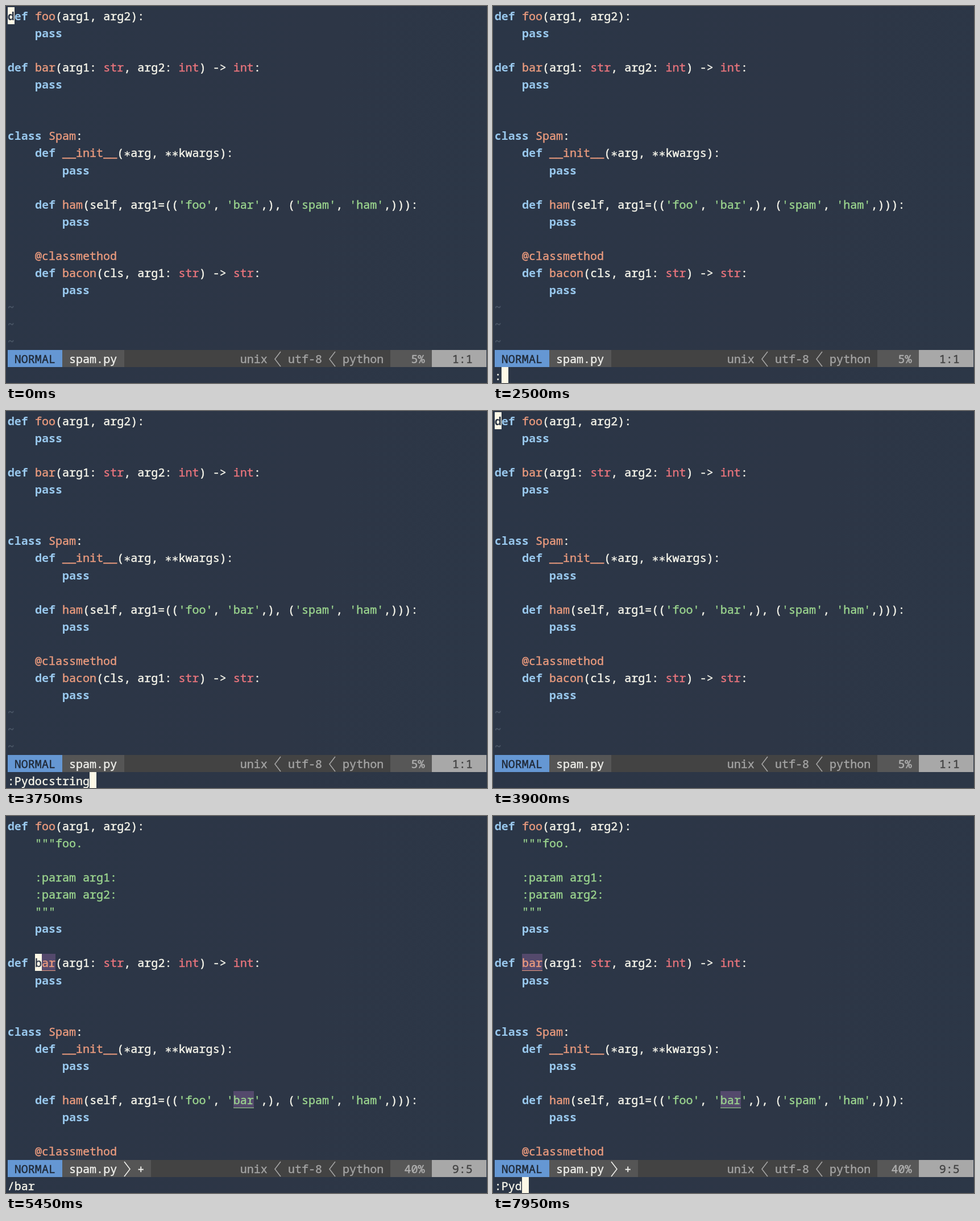
Animation, 846 px wide and 662 px high, one loop 8000 ms. Source, as an HTML page:

```html
<!DOCTYPE html>
<html lang="en">
<head>
<meta charset="utf-8">
<title>Docstring demo</title>
<style>
  html, body { margin: 0; width: 100%; height: 100%; overflow: hidden; background: #2c3646; }
  #stage {
    position: relative; width: 846px; height: 662px; overflow: hidden;
    background: linear-gradient(100deg, #2b3647, #2d3646 60%, #2c3747);
    color: #f8f7ec; font: 500 20.05px/32px "Noto Sans Mono", "DejaVu Sans Mono", monospace;
    font-variant-ligatures: none; -webkit-text-stroke: 0.4px currentColor;
  }
  #stage > * { position: absolute; box-sizing: border-box; height: 30.09px; white-space: pre; }
  #stage .key { color: #98c7ec; font-weight: 700; -webkit-text-stroke-width: 0; }
  .name { color: #eb9b7e; }
  .type { color: #ea757d; }
  .str { color: #9bd58e; }
  .star { padding-top: 4px; font-family: "DejaVu Sans Mono", monospace; }
  .tilde { color: #4c5868; }
  .match { background: #54496c; border-bottom: 1.5px solid; }
  .current { background: #9c5a66; }
  #stage .cursor { background: #fdf8e6; color: #2c3646; }
  .mode { background: #6597d3; color: #202a38; }
  .file { background: #555; color: #f0f0ec; }
  .info { background: #434343; color: #a4a4a4; }
  .pct { background: #575757; color: #b0b0b0; }
  .pos { background: #a8a8a8; color: #444; }
  svg { fill: none; stroke: currentColor; stroke-width: 1.6; }
</style>
</head>
<body>
<div id="stage"></div>
<script>
const LOOP = 8000, CW = 12.03, RH = 30.09, LEFT = 2.8, TOP = 1.7;
const STATUS = 20, CMD = 21;
const stage = document.getElementById('stage');

const code = `def foo(arg1, arg2):
    pass

def bar(arg1: str, arg2: int) -> int:
    pass


class Spam:
    def __init__(*arg, **kwargs):
        pass

    def ham(self, arg1=(('foo', 'bar',), ('spam', 'ham',))):
        pass

    @classmethod
    def bacon(cls, arg1: str) -> str:
        pass`.split('\n');
const doc = `    """foo.

    :param arg1:
    :param arg2:
    """`.split('\n');
const documented = [code[0], ...doc, ...code.slice(1)];

const rules = [
  ['str', /""".*|:param.*|'[^']*'/],
  ['key', /\b(?:def|class|pass)\b/],
  ['name', /(?<=def |class )\w+|@\w+/],
  ['type', /\b(?:str|int)\b/],
  ['star', /\*+/]
];
const lexer = new RegExp(rules.map(r => `(${r[1].source})`).join('|'), 'g');

// Each step keeps the values of the one before it.
const steps = [
  [0, { lines: code, mode: 'NORMAL', pct: '5%', pos: '1:1', at: [0, 0], cmd: '', typing: false, on: true, find: '', live: false }],
  [500, { on: false }],
  [950, { on: true }],
  [1300, { cmd: ':', typing: true }],
  [1900, { on: false }],
  [2250, { on: true }],
  [2550, { on: false }],
  [2800, { cmd: ':P', on: true }],
  [2950, { cmd: ':Py' }],
  [3150, { cmd: ':Pyd' }],
  [3300, { cmd: ':Pydo' }],
  [3450, { cmd: ':Pydoc' }],
  [3600, { cmd: ':Pydocstring' }],
  [3800, { cmd: '', typing: false }],
  [4200, { lines: documented, pct: '9%', pos: '2:5', at: [1, 4] }],
  [4550, { cmd: '/', typing: true }],
  [4750, { cmd: '/b', mode: 'COMMAND', pct: '40%', pos: '9:5', at: [8, 4], find: 'b', live: true }],
  [4900, { cmd: '/ba', find: 'ba' }],
  [5050, { cmd: '/bar', find: 'bar' }],
  [5200, { mode: 'NORMAL', typing: false, live: false }],
  [5700, { on: false }],
  [6000, { cmd: ':', typing: true, on: true }],
  [6350, { cmd: ':P' }],
  [6550, { on: false }],
  [6800, { cmd: ':Py', on: true }],
  [7200, { cmd: ':Pyd' }],
  [7700, { on: false }],
  [7900, { on: true }]
];
let last = {};
const states = steps.map(([time, change]) => (last = { ...last, ...change, time }));

function put(row, col, text, cls = '', cols = text.length) {
  const el = document.createElement('div');
  el.className = cls;
  el.textContent = text;
  el.style.cssText = `left:${LEFT + col * CW}px;top:${TOP + row * RH}px;width:${cols * CW}px`;
  stage.append(el);
}

function chevron(col, dir, color) {
  const x = LEFT + col * CW;
  const d = dir > 0 ? 'M1 3 11 16 1 29' : 'M11 3 1 16 11 29';
  stage.insertAdjacentHTML('beforeend',
    `<svg width="12" height="30" style="left:${x}px;top:${TOP + STATUS * RH}px;color:${color}"><path d="${d}"/></svg>`);
}

function drawLine(row, line, s) {
  const token = (col, text, cls) => {
    put(row, col, text, cls);
    const i = s.find ? text.indexOf(s.find) : -1;
    if (i < 0) return;
    const current = s.live && row === s.at[0] && col + i === s.at[1];
    put(row, col + i, s.find, `${cls} match${current ? ' current' : ''}`);
  };
  let end = 0;
  for (const m of line.matchAll(lexer)) {
    if (m.index > end) put(row, end, line.slice(end, m.index));
    token(m.index, m[0], rules[m.slice(1).findIndex(g => g !== undefined)][0]);
    end = m.index + m[0].length;
  }
  if (end < line.length) put(row, end, line.slice(end));
}

function drawStatus(s) {
  const dirty = s.lines === documented;
  const start = s.mode.length + 2;
  put(STATUS, 0, '', 'info', 56);
  put(STATUS, 0, ` ${s.mode} `, 'mode');
  put(STATUS, start, dirty ? ' spam.py   + ' : ' spam.py ', 'file');
  if (dirty) chevron(start + 9, 1, '#f0f0ec');
  else put(STATUS, start + 9, '', 'pct', 0.08);
  put(STATUS, 34, 'unix   utf-8   python', 'info');
  chevron(39, -1, '#a4a4a4');
  chevron(47, -1, '#a4a4a4');
  put(STATUS, 56, s.pct.padStart(5) + ' ', 'pct');
  put(STATUS, 62, s.pos.padStart(6) + '  ', 'pos');
}

function draw(s) {
  stage.replaceChildren();
  for (let row = 0; row < STATUS; row++) {
    if (row < s.lines.length) drawLine(row, s.lines[row], s);
    else put(row, 0, '~', 'tilde');
  }
  drawStatus(s);
  put(CMD, 0, s.cmd);
  if (!s.on) return;
  if (s.typing) put(CMD, s.cmd.length, ' ', 'cursor');
  else {
    const [row, col] = s.at;
    const bold = /^(def|class|pass)/.test(s.lines[row].slice(col)) ? ' key' : '';
    put(row, col, s.lines[row][col], 'cursor' + bold);
  }
}

let shown;
function tick() {
  const t = performance.now() % LOOP;
  const s = states.findLast(step => step.time <= t);
  if (s !== shown) draw(shown = s);
  requestAnimationFrame(tick);
}
tick();
</script>
</body>
</html>
```
